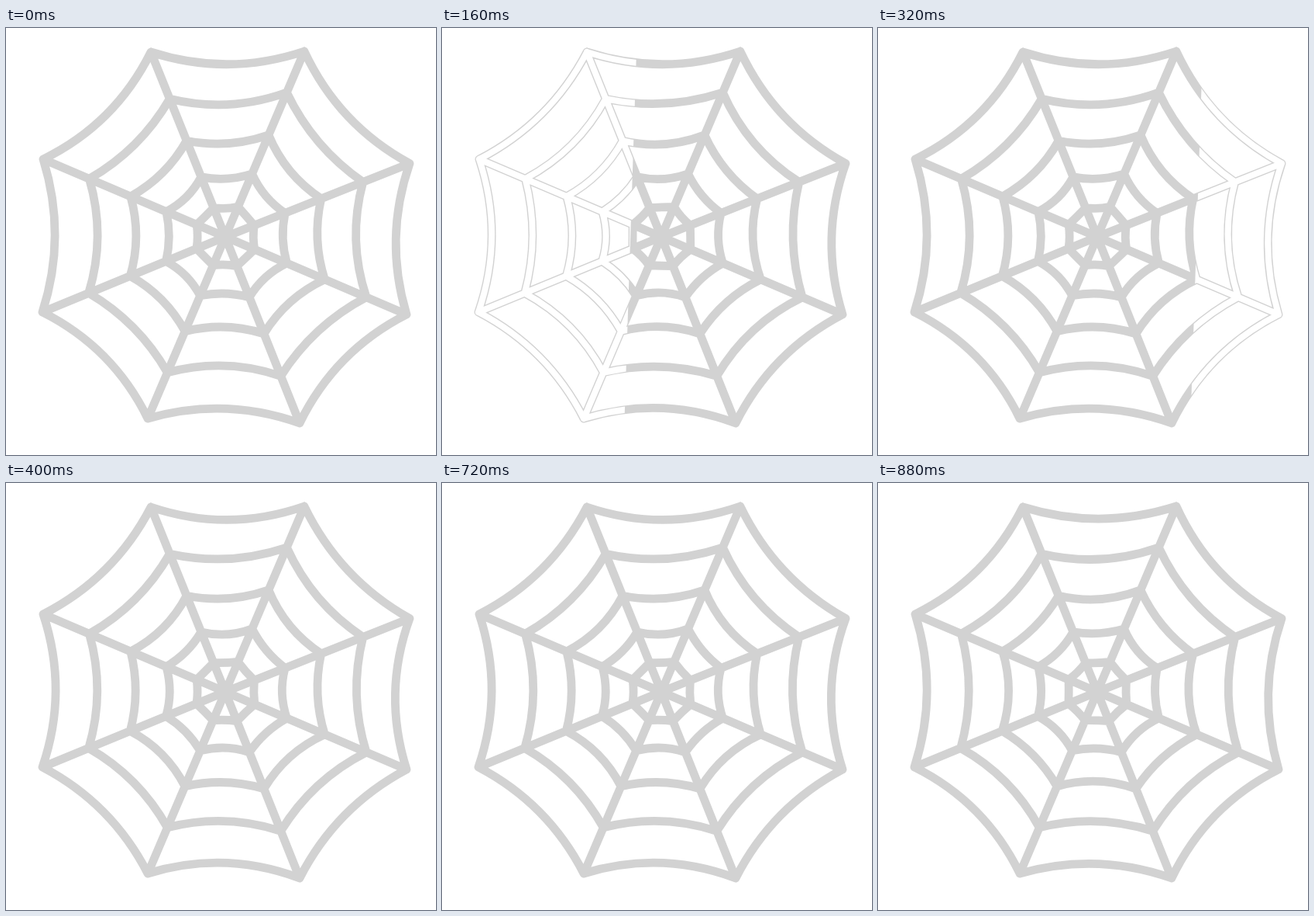
Animation of 555 by 550 pixels, one loop 960 ms. Source, as an HTML page with a canvas:

```html
<!DOCTYPE html>
<html lang="en">
<head>
<meta charset="utf-8">
<title>Spider web</title>
<style>
  html, body { margin: 0; width: 100%; height: 100%; overflow: hidden; background: #fff; }
  canvas { display: block; }
</style>
</head>
<body>
<canvas id="stage" width="555" height="550"></canvas>
<script>
const ctx = document.getElementById('stage').getContext('2d');
const STEP = 80, STEPS = 12, POSES = 4;
const HUB = [283, 269];

// Spoke tips, clockwise from the top left; two spokes carry their threads farther out.
const TIPS = [[187, 31], [385, 30], [521, 174.5], [517, 369],
              [379, 509], [183, 503], [47, 366], [48, 169]];
const isStretched = spoke => spoke === 1 || spoke === 3;

// Rings from the outside in: distance from the hub, and sag relative to thread length.
const RINGS = [
  { reach: 1, sag: .082 },
  { reach: .747, sag: .071 },
  { reach: .52, sag: .072 },
  { reach: .324, sag: .067 },
  { reach: .157, sag: .02 }
];

function node(spoke, reach) {
  const t = reach + (isStretched(spoke) ? .22 * reach ** 2 * (1 - reach) : 0);
  return HUB.map((h, axis) => h + (TIPS[spoke][axis] - h) * t);
}

function buildWeb(pose) {
  const path = new Path2D();
  for (const tip of TIPS) {
    path.moveTo(...HUB);
    path.lineTo(...tip);
  }
  RINGS.forEach(({ reach, sag }, ring) => {
    TIPS.forEach((_, spoke) => {
      const [ax, ay] = node(spoke, reach);
      const [bx, by] = node((spoke + 1) % TIPS.length, reach);
      const wobble = .7 * Math.sin(2 * Math.PI * pose / POSES + ring * 2 + spoke * 3);
      const pull = 2 * (sag + wobble / Math.hypot(bx - ax, by - ay));
      path.moveTo(ax, ay);
      path.quadraticCurveTo(
        (ax + bx) / 2 - (by - ay) * pull,
        (ay + by) / 2 + (bx - ax) * pull,
        bx, by);
    });
  });
  return path;
}

const webs = Array.from({ length: POSES }, (_, pose) => buildWeb(pose));

function strokeWeb(web, color, width) {
  ctx.strokeStyle = color;
  ctx.lineWidth = width;
  ctx.stroke(web);
}

// Slanted band of light that sweeps from left to right.
function clipToBand(step) {
  const right = 252 + 195 * (step - 2), left = right - 222, slant = 18;
  ctx.beginPath();
  ctx.moveTo(left, 0);
  ctx.lineTo(right, 0);
  ctx.lineTo(right - slant, 550);
  ctx.lineTo(left - slant, 550);
  ctx.clip();
}

function draw() {
  const step = Math.floor(performance.now() / STEP) % STEPS;
  const web = webs[step % POSES];
  ctx.fillStyle = '#fff';
  ctx.fillRect(0, 0, 555, 550);
  ctx.lineCap = ctx.lineJoin = 'round';
  strokeWeb(web, '#d2d2d2', 10.8);
  if (step >= 1 && step <= 4) {
    ctx.save();
    clipToBand(step);
    strokeWeb(web, '#fff', 8);
    ctx.restore();
  }
  requestAnimationFrame(draw);
}
draw();
</script>
</body>
</html>
```
